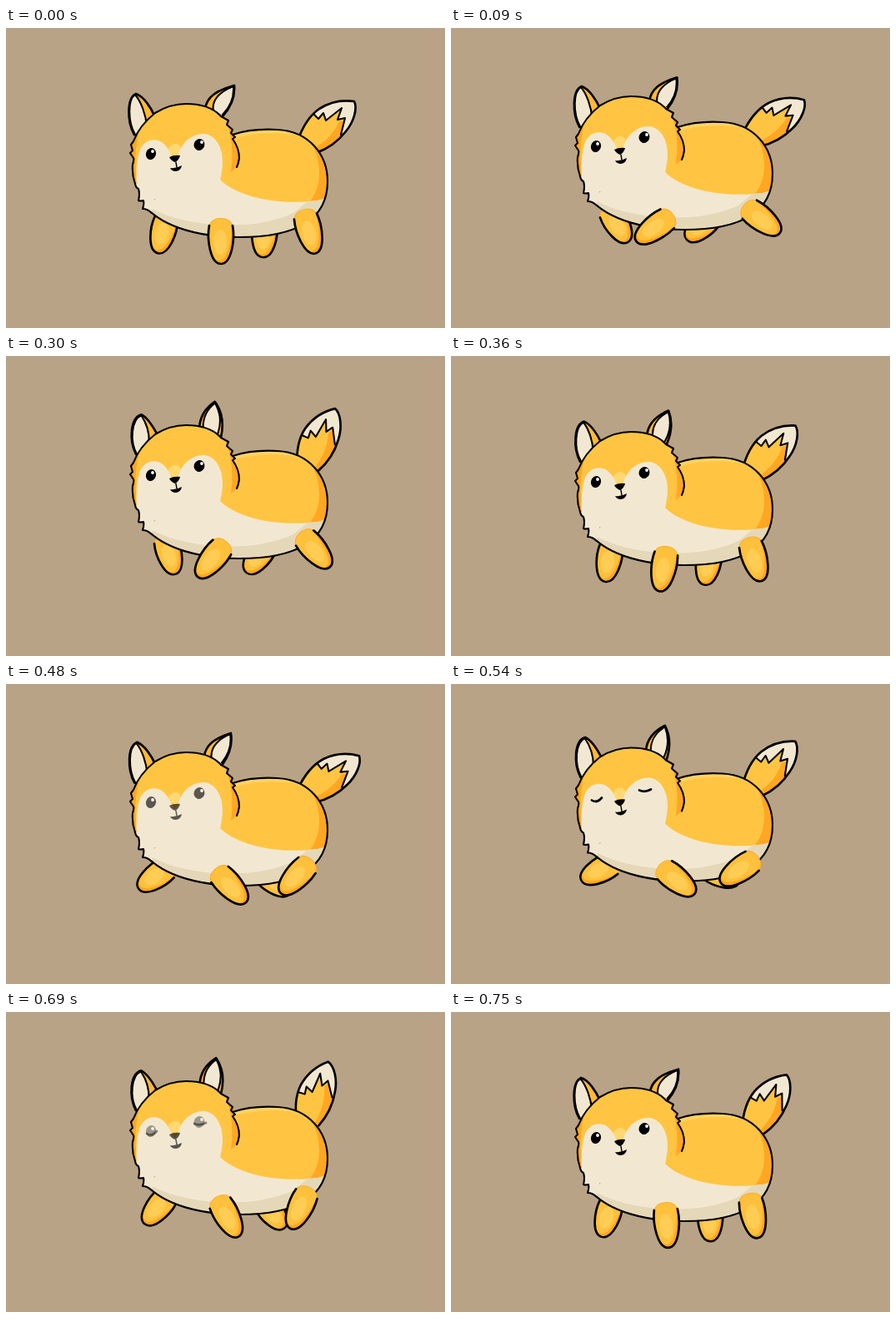
These frames come from a looping animation (527 px wide and 360 px high, 780 ms). An HTML page:

```html
<!DOCTYPE html>
<html lang="en">
<head>
<meta charset="utf-8">
<title>Hopping fox</title>
<style>
  html, body { margin: 0; width: 100%; height: 100%; overflow: hidden; background: #b8a386; }
  svg { display: block; }
  .ink { fill: none; stroke: #000; stroke-width: 2.1; stroke-linecap: round; stroke-linejoin: round; }
  .bold { stroke-width: 2.7; }
  .gold { fill: #ffc542; }
  .amber { fill: #ffa622; }
  .cream { fill: #f2e8d2; }
</style>
</head>
<body>
<svg width="527" height="360" viewBox="0 0 527 360">
  <defs>
    <g id="leg">
      <path class="amber" d="M-14-2C-12-14 12-14 14-2C17 14 13 44 0 44C-13 44-17 14-14-2Z"/>
      <path fill="#ffc03c" d="M-13-2C-11-13 11-13 13-2C13 14 8 40-2 40C-13 40-15 14-13-2Z"/>
      <ellipse cx="-1" cy="18" rx="8" ry="15" fill="#ffcc54"/>
      <path class="ink bold" d="M-14-2C-17 14-13 44 0 44C13 44 17 14 14-2"/>
    </g>
    <path id="trunk" d="M272 128C290 122 310 121 326 122C364 124 386 152 386 184C386 228 352 251 280 251C235 251 190 240 168 215"/>
    <path id="skull" d="M175 222Q170 217 164 217Q166 212 165 207Q161 208 159 207Q161 199 159 193Q156 192 155 187Q151 176 152 164Q154 158 153 156L149 150L152 147L150 140L153 136Q160 117 179 102C192 94 204 91 216 91C236 91 250 97 258 106L267 111L265 116L272 122L270 126L275 131L272 133C277 140 280 148 280 156Q279 163 277 167"/>
    <path id="brush" d="M350 136C356 118 366 104 376 97C390 88 404 86 418 88C422 96 418 112 408 124C398 137 386 145 372 150"/>
    <clipPath id="trunkClip"><use href="#trunk"/></clipPath>
    <clipPath id="skullClip"><path id="skullShape"/></clipPath>
    <clipPath id="brushClip"><use href="#brush"/></clipPath>
  </defs>

  <g id="fox">
    <use href="#leg" id="farFront"/>
    <use href="#leg" id="farBack"/>

    <g id="tail">
      <use href="#brush" class="gold"/>
      <g clip-path="url(#brushClip)">
        <path class="amber" d="M360 150C378 141 392 130 400 112L430 110V160H360Z"/>
        <path class="cream" id="tipFill"/>
      </g>
      <path class="ink" id="tipEdge" d="M370 104L375 109L381 102L384 111L403 96L398 110L407 108L402 128"/>
      <use href="#brush" class="ink bold"/>
    </g>

    <path class="ink bold" id="earL"/><path class="ink" id="innerL"/>
    <path class="ink bold" id="earR"/><path class="ink" id="innerR"/>

    <use href="#trunk" class="gold"/>
    <g clip-path="url(#trunkClip)">
      <path fill="#ffd263" d="M268 118H356L358 131C335 124 300 125 276 132Z"/>
      <path class="amber" d="M364 132C381 162 379 192 364 209L390 206V140Z"/>
      <path class="cream" d="M257 182C275 200 320 214 374 207L390 204V260H150V182Z"/>
      <path fill="#e5d8b9" d="M166 211C200 236 290 248 345 222L362 208L374 207L390 202V260H160Z"/>
    </g>
    <use href="#trunk" class="ink"/>

    <g clip-path="url(#skullClip)">
      <path class="gold" d="M140 80H290V178H160V194H140Z"/>
      <path class="amber" d="M258 98C272 125 274 150 269 178H285V98ZM162 116C155 140 154 160 157 190H145V116Z"/>
      <path fill="#ffd872" d="M195 152C193 144 198 139 203 139C209 139 212 145 208 153Z"/>
      <path class="cream" d="M150 189L157 187C156 175 157 160 160 149C164 135 177 131 187 137C194 142 196 148 199 154L203 159L207 153C209 140 222 126 239 127C255 130 263 150 259 172L257 183V230H150Z"/>
    </g>
    <use href="#skull" class="ink"/>

    <use href="#leg" id="nearFront"/>
    <use href="#leg" id="nearBack"/>

    <g id="awake">
      <g id="muzzle">
        <path d="M196 155Q202 152 209 153Q208 158 203 161Q198 159 196 155Z"/>
        <path class="ink" style="stroke-width:1.5" d="M204 161L205 167"/>
        <path d="M197 168Q204 169 211 165Q210 171 204 172Q199 172 197 168Z"/>
      </g>
      <ellipse cx="174" cy="151" rx="6" ry="7" transform="rotate(18 174 151)"/>
      <ellipse cx="232" cy="140" rx="6.4" ry="7" transform="rotate(18 232 140)"/>
      <circle cx="176" cy="148" r="1.9" fill="#fff"/>
      <circle cx="235" cy="137" r="1.9" fill="#fff"/>
    </g>
    <g id="asleep">
      <use href="#muzzle"/>
      <path class="ink bold" d="M169 154Q175 158 181 151M226 142Q233 145 240 141"/>
    </g>
  </g>
</svg>

<script>
const LOOP = 780, HOP = 390, STEP = 30;
const $ = id => document.getElementById(id);
const set = (id, name, value) => $(id).setAttribute(name, value);

set('skullShape', 'd', $('skull').getAttribute('d') + 'L258 183V205H178Z');
set('tipFill', 'd', $('tipEdge').getAttribute('d') + 'L440 120V70H366Z');

// Smooth periodic curve through (times, values).
function track(times, values, period = LOOP) {
  const n = times.length;
  const at = i => {
    const k = (i % n + n) % n;
    return [times[k] + Math.floor(i / n) * period, values[k]];
  };
  const slope = i => {
    const [a, p] = at(i - 1), [b, q] = at(i + 1);
    return (q - p) / (b - a);
  };
  return time => {
    const t = time % period;
    let i = n - 1;
    while (i > 0 && times[i] > t) i--;
    const [a, p] = at(i), [b, q] = at(i + 1);
    const d = b - a, u = (t - a) / d, v = 1 - u;
    return v * v * (1 + 2 * u) * p + u * u * (3 - 2 * u) * q
      + d * u * v * (v * slope(i) - u * slope(i + 1));
  };
}

const POSES = [0, 90, 210, 360, 480, 630, 750];
const lift = track([0, 90, 150, 210, 240, 300, 360], [0, -9, -14.5, -16.7, -15.3, -8, 0], HOP);
const perk = track(POSES, [0, .08, 1, .38, .12, 1.05, .03]);
const wag = track(
  [0, 45, 90, 150, 210, 250, 360, 435, 480, 540, 630, 660, 750],
  [0, 13, 7, -5, -28.5, -33, -4.7, 13, 7, -5, -30.8, -33, -14.8]);

const legs = [
  ['farFront', 192, 231, .92, [14, -30, -47, 10, 54, 58, 16]],
  ['farBack', 311, 237, .87, [4, 47, 61, 10, -52, -65, -1]],
  ['nearFront', 258, 239, 1, [0, 54, 73, 10, -43, -48, -4]],
  ['nearBack', 360, 228, 1, [-15, -52, -65, -17, 43, 53, -11]]
].map(([id, x, y, size, angles]) => ({ id, x, y, size, swing: track(POSES, angles) }));

// Each ear part: folded back, then upright.
const ears = {
  earL: ['M154 128C145 112 145 84 156 79C165 82 174 95 179 107',
         'M157 125C148 106 152 80 166 78C172 82 178 92 184 102'],
  innerL: ['M155 128C146 112 146 86 155 80C162 88 168 104 169 118',
           'M158 125C149 108 153 83 166 79C171 88 174 98 173 108'],
  earR: ['M239 97C241 83 252 75 274 69C275 82 270 95 260 106',
         'M229 93C229 80 234 68 240 60C250 68 259 82 257 106'],
  innerR: ['M249 100C247 90 252 78 273 70C274 83 270 94 260 104',
           'M231 94C231 82 235 70 241 62C249 72 254 82 252 99']
};
for (const id in ears) $(id).style.fill = id.startsWith('ear') ? '#ffb934' : '#f2e8d2';

function morph([from, to], w) {
  const ends = to.match(/\d+/g);
  let i = 0;
  return from.replace(/\d+/g, s => (+s + (ends[i++] - s) * w).toFixed(2));
}

const clamp = v => Math.min(1, Math.max(0, v));

function draw(t) {
  set('fox', 'transform', `translate(0 ${lift(t)})`);
  set('tail', 'transform', `rotate(${wag(t)} 362 140)`);
  for (const { id, x, y, size, swing } of legs) {
    set(id, 'transform', `translate(${x} ${y}) rotate(${swing(t)}) scale(1 ${size})`);
  }
  const w = perk(t);
  for (const id in ears) set(id, 'd', morph(ears[id], w));

  const open = clamp(Math.max((533 - t) / 86, (t - 660) / 86));
  set('awake', 'opacity', open);
  set('asleep', 'opacity', clamp(1 - 1.6 * open));
}

const start = performance.now();
function tick() {
  const t = (performance.now() - start) % LOOP;
  draw(Math.floor(t / STEP) * STEP);
  requestAnimationFrame(tick);
}
tick();
</script>
</body>
</html>
```
